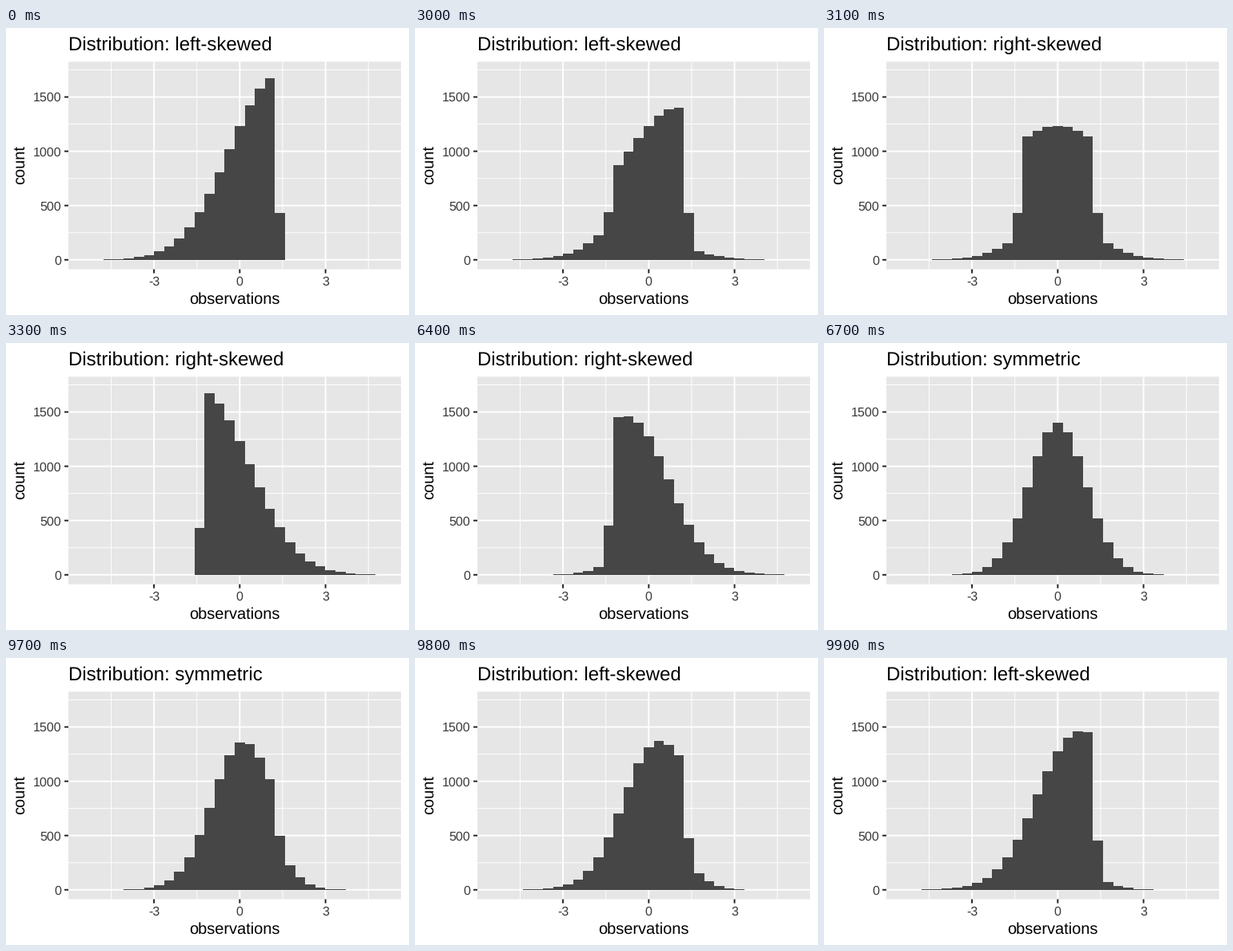
Write a matplotlib script that moves like this. It is 504 px wide and 360 px high and loops after 10000 ms.

```python
from math import erf, pi, sqrt

import numpy as np
import matplotlib.pyplot as plt
from matplotlib.animation import FuncAnimation

W, H, DPI = 504, 360, 72
LEFT, RIGHT, TOP, BOTTOM = 78.05, 494, 42.3, 302.6
PAD_X, PAD_Y = (RIGHT - LEFT) / 22, (BOTTOM - TOP) / 22
BINS, BIN_WIDTH, SAMPLES, PEAK = 30, 0.3525, 10000, 1738
MAJOR, MINOR, TICK_LEN = 1.94, 0.97, 5
BAR, PANEL, TICK, LABEL = "#464646", "#E6E6E6", "#232323", "#3A3A3A"
FRAMES, INTERVAL, STEPS = 100, 100, 4

plt.rcParams.update({"font.family": "Liberation Sans", "text.hinting": "none",
                     "text.hinting_factor": 1})

edges = (np.arange(BINS + 1) - BINS / 2 - 0.5) * BIN_WIDTH


def px(x):
    unit = (RIGHT - LEFT - 2 * PAD_X) / (BINS * BIN_WIDTH)
    return LEFT + PAD_X + (x - edges[0]) * unit


def py(count):
    return BOTTOM - PAD_Y - count * (BOTTOM - TOP - 2 * PAD_Y) / PEAK


def normal_cdf(x):
    return 0.5 * (1 + erf(x / sqrt(2)))


def half_normal_cdf(x):
    """Half-normal shifted and scaled to mean 0 and variance 1."""
    scale = 1 / sqrt(1 - 2 / pi)
    return erf(max(x / scale + sqrt(2 / pi), 0) / sqrt(2))


def histogram(cdf):
    return SAMPLES * np.diff([cdf(x) for x in edges])


COUNTS = {
    "left-skewed": histogram(lambda x: 1 - half_normal_cdf(-x)),
    "right-skewed": histogram(half_normal_cdf),
    "symmetric": histogram(normal_cdf),
}
NAMES = list(COUNTS)
STARTS = [30, 64, 97]

fig = plt.figure(figsize=(W / DPI, H / DPI), dpi=DPI, facecolor="white")
ax = fig.add_axes([0, 0, 1, 1])
ax.axis("off")


def line(xs, ys, color, width, z):
    ax.plot(xs, ys, color=color, lw=width, zorder=z, snap=False,
            solid_capstyle="butt")


def vline(x, width, z):
    line([px(x)] * 2, [TOP, BOTTOM], "white", width, z)


def hline(count, width, z):
    line([LEFT, RIGHT], [py(count)] * 2, "white", width, z)


def label(x, y, text, size, color="black", ha="center", **kw):
    return ax.text(x, y, text, fontsize=size, color=color, ha=ha,
                   va="baseline", **kw)


ax.fill([LEFT, RIGHT, RIGHT, LEFT], [TOP, TOP, BOTTOM, BOTTOM],
        color=PANEL, lw=0, zorder=0, snap=False)

for x in np.arange(-4.5, 5, 3):
    vline(x, MINOR, 1)
for count in range(250, 2000, 500):
    hline(count, MINOR, 1)
for x in (-3, 0, 3):
    vline(x, MAJOR, 2)
    line([px(x)] * 2, [BOTTOM, BOTTOM + TICK_LEN], TICK, MAJOR, 2)
    label(px(x), 323, str(x), 16, LABEL)
for count in range(0, 2000, 500):
    hline(count, MAJOR, 2)
    line([LEFT - TICK_LEN, LEFT], [py(count)] * 2, TICK, MAJOR, 2)
    label(LEFT - TICK_LEN - 4, py(count) + 5.75, str(count), 16, LABEL, ha="right")

label((LEFT + RIGHT) / 2, 345.8, "observations", 20)
label(24.4, 171.5, "count", 20, rotation=90, rotation_mode="anchor")
title = label(LEFT, 27.6, "", 24, ha="left")

# Bars sit on whole pixels, so their sides stay crisp.
base = np.round(py(0))
bars = ax.stairs(np.full(BINS, base), np.round(px(edges)), baseline=base,
                 fill=True, color=BAR, lw=0, snap=False, zorder=3)
ax.set(xlim=(0, W), ylim=(H, 0))


def state(n):
    """Bar heights and the name of the nearest distribution."""
    i = max(sum(n >= start for start in STARTS) - 1, 0)
    a, b = NAMES[i], NAMES[(i + 1) % len(NAMES)]
    t = np.clip((n - STARTS[i] + 1) / STEPS, 0, 1)
    return (1 - t) * COUNTS[a] + t * COUNTS[b], a if t < 0.5 else b


def draw(n):
    counts, name = state(n)
    bars.set_data(values=np.round(py(counts)))
    title.set_text(f"Distribution: {name}")
    return bars, title


anim = FuncAnimation(fig, draw, frames=FRAMES, interval=INTERVAL, repeat=True)
plt.show()
```
